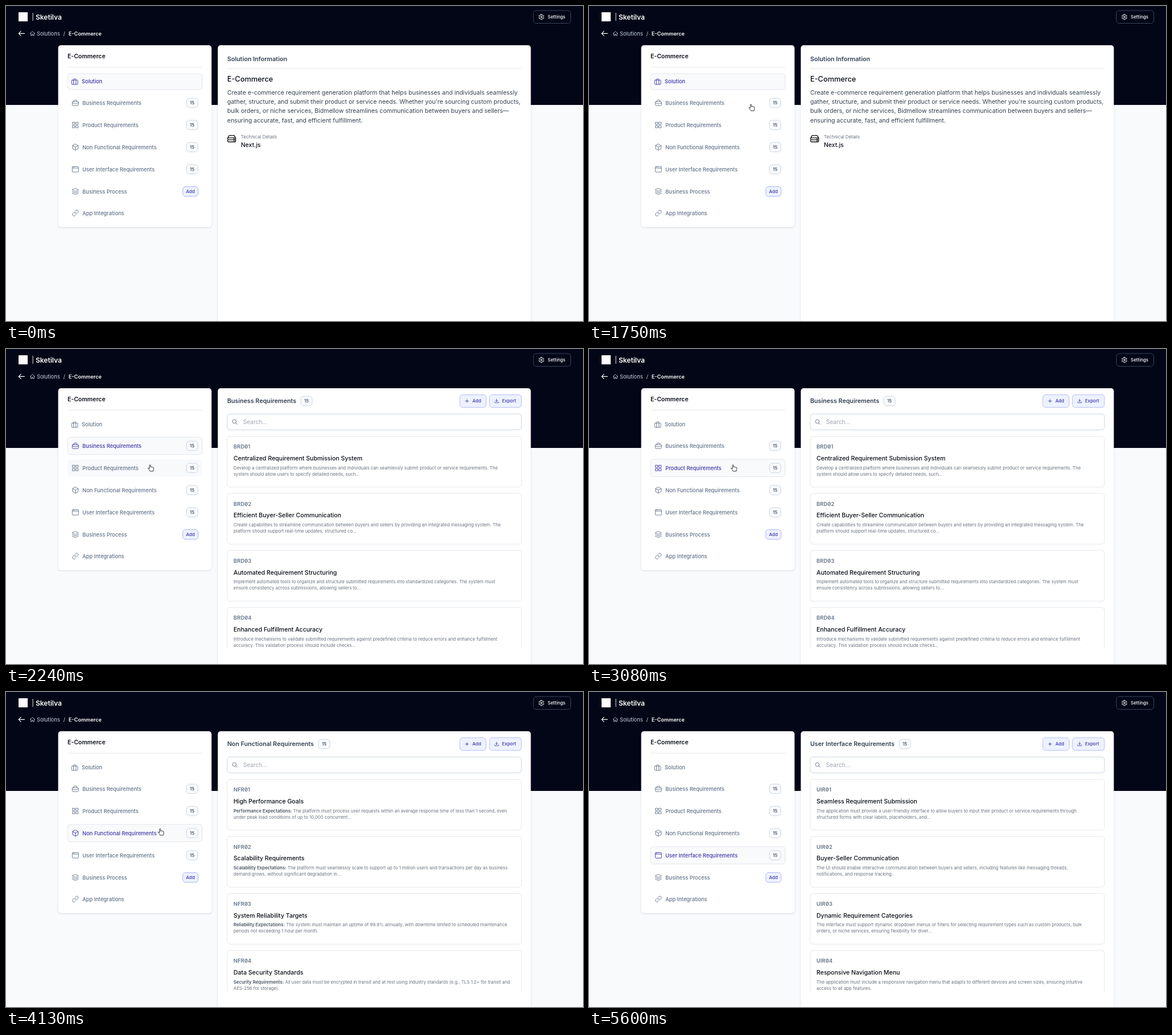
An HTML page for the animation above (6440 ms loop, 1012 by 554 pixels).

```html
<!DOCTYPE html>
<html lang="en">
<head>
<meta charset="utf-8">
<title>Requirements walkthrough</title>
<style>
html, body { margin: 0; width: 100%; height: 100%; overflow: hidden; background: #f8fafc; }
svg { display: block; width: 1012px; height: 554px; font-family: Inter, "Open Sans", sans-serif; }
.icon { fill: none; stroke-linecap: round; stroke-linejoin: round; }
.row { --ink: #64748b; --box: none; --edge: none; }
.row.hover { --box: #f8f9fb; }
.row.active { --ink: #3f38a8; --box: #f9fafb; --edge: #e2e5ea; }
.code { font-feature-settings: "zero"; letter-spacing: .1px; }
.card { filter: drop-shadow(0 1px 1.5px rgba(15, 23, 42, .14)); }
</style>
</head>
<body>
<svg id="stage" viewBox="0 0 1012 554"></svg>
<script>
const LOOP = 6440, STEP = 70;
const INDIGO = '#3f38a8', SLATE = '#64748b', DARK = '#334155', BODY = '#6b7280', LINE = '#e5e7eb';

const ICON = {
  solution: 'M4 7h16q2 0 2 2v10q0 2-2 2H4q-2 0-2-2V9q0-2 2-2ZM8 21V5q0-2 2-2h4q2 0 2 2v16',
  business: 'M4 8h16q2 0 2 2v8q0 3-3 3H5q-3 0-3-3v-8q0-2 2-2ZM7 8V6q0-3 3-3h4q3 0 3 3v2M2 12c6 4 14 4 20 0',
  grid: 'M3 3h7v7H3ZM14 3h7v7h-7ZM14 14h7v7h-7ZM3 14h7v7H3Z',
  cube: 'M12 2l9 5v10l-9 5-9-5V7ZM3 7l9 5 9-5M12 12v10',
  window: 'M4 3h16q2 0 2 2v14q0 2-2 2H4q-2 0-2-2V5q0-2 2-2ZM2 8h20M5 5.5h.1M8 5.5h.1',
  layers: 'M12 2l10 5-10 5L2 7ZM2 12l10 5 10-5M2 17l10 5 10-5',
  link: 'M10 13a5 5 0 0 0 7.5.5l3-3a5 5 0 0 0-7-7l-1.7 1.7M14 11a5 5 0 0 0-7.5-.5l-3 3a5 5 0 0 0 7 7l1.7-1.7',
  home: 'M2 12l10-9 10 9M5 10v11h5v-6h4v6h5V10',
  back: 'M21 12H3M10 5l-7 7 7 7',
  plus: 'M12 4v16M4 12h16',
  download: 'M3 16v3q0 2 2 2h14q2 0 2-2v-3M12 3v12M7 10l5 5 5-5',
  search: 'M16 16l6 6M18 10a8 8 0 1 1-16 0a8 8 0 1 1 16 0',
  gear: 'M10 2h4l.6 3 2.2 1.2 2.9-1 2 3.5-2.3 2v2.6l2.3 2-2 3.5-2.9-1-2.2 1.2-.6 3h-4l-.6-3-2.2-1.2-2.9 1-2-3.5 2.3-2v-2.6l-2.3-2 2-3.5 2.9 1 2.2-1.2ZM15 12a3 3 0 1 1-6 0a3 3 0 1 1 6 0',
  server: 'M2 11l3-6q.6-1 2-1h10q1.4 0 2 1l3 6M4 10h16q2 0 2 2v1q0 2-2 2H4q-2 0-2-2v-1q0-2 2-2ZM4 15h16q2 0 2 2v1q0 2-2 2H4q-2 0-2-2v-1q0-2 2-2ZM17 12.5h2M17 17.5h2'
};

// Text is placed by the vertical centre of its capitals.
const text = (x, y, str, size, fill = BODY, weight = 400, extra = '') =>
  `<text x="${x}" y="${(y + size * .36).toFixed(2)}" font-size="${size}" font-weight="${weight}" style="fill:${fill}" ${extra}>${str}</text>`;
const rect = (x, y, w, h, fill, stroke = 'none', r = 5, extra = '') =>
  `<rect x="${x}" y="${y}" width="${w}" height="${h}" rx="${r}" style="fill:${fill};stroke:${stroke}" ${extra}/>`;
const icon = (name, x, y, size, color, width = 1.7) =>
  `<path class="icon" d="${ICON[name]}" transform="translate(${x - size / 2} ${y - size / 2}) scale(${size / 24})" style="stroke:${color}" stroke-width="${width}"/>`;
const rule = (x, y, w) => rect(x, y, w, 1, LINE, 'none', 0);
const centered = 'text-anchor="middle"';
const badge = (x, y) => rect(x + .5, y - 8.3, 20, 16.6, '#f8fafc', '#cbd5e1') +
  text(x + 10.5, y, '15', 7.8, DARK, 500, centered);

const ROWS = [
  ['Solution', 'solution', 133, 14],
  ['Business Requirements', 'business', 170.3, 15.3, 15],
  ['Product Requirements', 'grid', 209.3, 15.3, 15],
  ['Non Functional Requirements', 'cube', 248.2, 15.3, 15],
  ['User Interface Requirements', 'window', 287.2, 15.3, 15],
  ['Business Process', 'layers', 326.2, 15.3, 'Add'],
  ['App Integrations', 'link', 364.2, 14]
];

function row([label, glyph, y, half, tag], i) {
  const x = i ? 134 : 132.8;
  let out = rect(108, y - half, 236, half * 2, 'var(--box)', 'var(--edge)') +
    icon(glyph, x - 12.3, y, 13, 'var(--ink)') + text(x, y, label, 9.28, 'var(--ink)', 500);
  if (tag === 15) out += badge(316, y);
  if (tag === 'Add') out += rect(310, y - 8.5, 27, 17, '#eef2ff', '#a5b4fc') + text(323.5, y, tag, 7.95, INDIGO, 500, centered);
  return `<g class="row">${out}</g>`;
}

const LISTS = [
  ['Business Requirements', 516.5, 'BRD', [
    ['Centralized Requirement Submission System', 'Develop a centralized platform where businesses and individuals can seamlessly submit product or service requirements. The', 'system should allow users to specify detailed needs, such...'],
    ['Efficient Buyer-Seller Communication', 'Create capabilities to streamline communication between buyers and sellers by providing an integrated messaging system. The', 'platform should support real-time updates, structured co...'],
    ['Automated Requirement Structuring', 'Implement automated tools to organize and structure submitted requirements into standardized categories. The system must', 'ensure consistency across submissions, allowing sellers to...'],
    ['Enhanced Fulfillment Accuracy', 'Introduce mechanisms to validate submitted requirements against predefined criteria to reduce errors and enhance fulfillment', 'accuracy. This validation process should include checks...']
  ]],
  ['Product Requirements', 510, 'PRD', [
    ['Centralized Requirement Submission', 'Develop a centralized platform enabling seamless submission of detailed product or service requirements in a structured format for', 'clarity and accurac...',
      ['Submission Form Screen: Allows users to specify product/service details, including categories, quantities, and preferences.', 'Confirmation Scree...'],
      ['Business Owners: Submit bulk or custom product requirements efficiently.', 'Individuals: Submit niche service or product needs quickly.']],
    ['Integrated Messaging System', 'Create an integrated messaging feature to facilitate real-time communication, structured conversations, and automated', 'notifications between buyers and...',
      ['Messaging Dashboard: Displays ongoing conversations with sellers and notification updates.', 'New Message Screen: Allows users to initiate commun...'],
      ['Buyers: Communicate requirements and receive updates easily.']]
  ]],
  ['Non Functional Requirements', 547.5, 'NFR', [
    ['High Performance Goals', 'Performance Expectations:| The platform must process user requests within an average response time of less than 1 second, even', 'under peak load conditions of up to 10,000 concurrent...'],
    ['Scalability Requirements', 'Scalability Expectations:| The platform must seamlessly scale to support up to 1 million users and transactions per day as business', 'demand grows, without significant degradation in...'],
    ['System Reliability Targets', 'Reliability Expectations:| The system must maintain an uptime of 99.9% annually, with downtime limited to scheduled maintenance', 'periods not exceeding 1 hour per month.'],
    ['Data Security Standards', 'Security Requirements:| All user data must be encrypted in transit and at rest using industry standards (e.g., TLS 1.2+ for transit and', 'AES-256 for storage).']
  ]],
  ['User Interface Requirements', 543.5, 'UIR', [
    ['Seamless Requirement Submission', 'The application must provide a user-friendly interface to allow buyers to input their product or service requirements through', 'structured forms with clear labels, placeholders, and...'],
    ['Buyer-Seller Communication', 'The UI should enable interactive communication between buyers and sellers, including features like messaging threads,', 'notifications, and response tracking.'],
    ['Dynamic Requirement Categories', 'The interface must support dynamic dropdown menus or filters for selecting requirement types such as custom products, bulk', 'orders, or niche services, ensuring flexibility for diver...'],
    ['Responsive Navigation Menu', 'The application must include a responsive navigation menu that adapts to different devices and screen sizes, ensuring intuitive', 'access to all app features.']
  ]]
];

function bullets(title, items, y) {
  return text(399, y, title, 7.95, '#4b5563', 600) + items.map((item, i) =>
    text(403.5, y + 16.3 + i * 17.8, i + 1 + '.', 7.8, '#b6bcc6') +
    text(415.5, y + 16.3 + i * 17.8, item, 7.8)).join('');
}

function card([title, first, second, screens, personas], code, y) {
  const [lead, rest] = first.includes('|') ? first.split('|') : ['', first];
  const strong = lead && `<tspan font-weight="600" style="fill:#4b5563">${lead}</tspan>`;
  let out = rect(388, y, 516, screens ? 202.7 : 89.2, '#fff', LINE) +
    text(399, y + 18.3, code, 9.3, SLATE, 600, 'class="code"') +
    text(399, y + 38.5, title, 10.55, '#0b0f19', 500) +
    text(399, y + 55.2, strong + rest, 7.81) + text(399, y + 66.1, second, 7.81);
  if (screens) {
    out += rect(849, y + 11, 44, 22.5, '#fff', LINE) + text(871, y + 22.3, 'Stories', 8.05, '#111827', 500, centered) +
      bullets('Screens:', screens, y + 88.5) + bullets('Personas:', personas, y + 145.3);
  }
  return out;
}

function list([title, badgeX, code, cards]) {
  const pitch = cards[0][3] ? 213.9 : 100.3;
  return `<g class="view">${text(388, 91.4, title, 10.7, DARK, 600)}${badge(badgeX, 91.4)}<g clip-path="url(#scroll)">` +
    cards.map((c, i) => card(c, `${code}0${i + 1}`, 153.7 + i * pitch)).join('') + '</g></g>';
}

const addButton = (fill, edge, ink, id) => `<g id="${id}">${rect(796, 80.4, 46, 22.4, fill, edge)}` +
  `${icon('plus', 808.5, 91.5, 8.4, ink, 2.4)}${text(818, 91.5, 'Add', 7.95, ink, 500)}</g>`;

const INTRO = [
  'Create e-commerce requirement generation platform that helps businesses and individuals seamlessly',
  "gather, structure, and submit their product or service needs. Whether you're sourcing custom products,",
  'bulk orders, or niche services, Bidmellow streamlines communication between buyers and sellers—',
  'ensuring accurate, fast, and efficient fulfillment.'
];

const overview = '<g class="view">' + text(388, 93.5, 'Solution Information', 10.73, DARK, 600) + rule(388, 109.5, 516) +
  text(388, 128.4, 'E-Commerce', 12.75, '#0b0f19', 500) +
  INTRO.map((s, i) => text(388, 151.8 + i * 16.35, s, 10.53, '#374151')).join('') +
  icon('server', 395.8, 233.3, 17, '#111', 1.9) + text(412, 230.6, 'Technical Details', 7.87) +
  text(412, 244.3, 'Next.js', 10.4, '#0b0f19', 500) + '</g>';

const toolbar = '<g id="tools">' + addButton('#fff', LINE, '#111827', 'plain') + addButton('#eef2ff', '#b3bdf5', INDIGO, 'tinted') +
  rect(848, 80.4, 56, 22.4, '#eef2ff', '#b3bdf5') + icon('download', 860.5, 91.3, 9, INDIGO, 2.2) +
  text(870, 91.5, 'Export', 7.95, INDIGO, 500) + rect(388, 114.2, 516, 28, '#fff', '#cbd5e1') +
  icon('search', 401.3, 128.3, 10, SLATE, 2.2) + text(415.8, 128.4, 'Search...', 10.2, '#9ca3af') + '</g>';

const header = rect(0, 0, 1012, 174, '#020617', 'none', 0) +
  rect(22, 11, 16, 16, '#fff', 'none', 0) + rect(46.6, 12, 1, 14, '#e2e8f0', 'none', 0) +
  text(52, 19.3, 'Sketilva', 12, '#fff', 600) +
  rect(925, 8, 65.5, 22.5, 'none', '#3b4558') + icon('gear', 939, 19.2, 11, '#fff', 2.1) +
  text(950, 19.2, 'Settings', 7.95, '#fff', 500) +
  icon('back', 27.3, 48.4, 13.5, '#fff', 2) + icon('home', 46.4, 48.3, 10, '#cbd5e1', 1.9) +
  text(54, 48.6, 'Solutions', 9.3, '#cbd5e1') + text(100.5, 48.6, '/', 9.3, '#cbd5e1') +
  text(109.8, 48.6, 'E-Commerce', 9.1, '#fff', 600);

const cursor = '<g id="cursor"><path id="hand" transform="translate(-6 -6.3)" fill="#fff" stroke="#222" stroke-width=".9" stroke-linejoin="round" ' +
  'd="M3.6 7.6V1.6a1 1 0 0 1 2 0V5q.1-.8 1-.8t1 .9q.2-.6.9-.6t.9.9q.2-.4.8-.4.8 0 .8 1V8.6c0 1-.9 1.8-.9 3.4H4.6C4.4 10.4 2.2 8.6 1.2 7.4.6 6.6 1.5 5.9 2.2 6.4Z"/>' +
  '<path id="arrow" transform="translate(-3.5 -6)" fill="#000" stroke="#fff" stroke-width=".9" d="M0 0V11l2.6-2.4 1.7 3.9 1.7-.7-1.7-3.8H8Z"/></g>';

const stage = document.getElementById('stage');
stage.innerHTML = '<clipPath id="scroll"><rect x="380" y="150" width="532" height="377"/></clipPath>' + header +
  rect(91.5, 69, 269, 320, '#fff', 'none', 5, 'class="card"') + rect(371.5, 69, 549, 500, '#fff', 'none', 5, 'class="card"') +
  text(108, 88.2, 'E-Commerce', 10.45, '#0b0f19', 600) + rule(108, 107, 236) +
  ROWS.map(row).join('') + overview + LISTS.map(list).join('') + toolbar + cursor;

const rows = [...stage.querySelectorAll('.row')], views = [...stage.querySelectorAll('.view')];
const [tools, plain, tinted, pointer, hand, arrow] =
  ['tools', 'plain', 'tinted', 'cursor', 'hand', 'arrow'].map(id => document.getElementById(id));

const SELECT = [1820, 3080, 4130, 5040];
const SHOW = [1820, 3150, 4130, 5040];
const PATH = [
  [70, 478, 519], [350, 143, 136.5], [560, 285.3, 178.6], [1820, 285.3, 178.6], [2240, 254, 209.3],
  [3150, 254, 209.3], [3570, 271.7, 246.2], [4270, 271.7, 246.2], [4550, 271.7, 288.3],
  [5390, 271.7, 288.3], [5530, 422.5, 528]
];

const clamp = v => Math.max(0, Math.min(1, v));
const passed = (times, t) => times.filter(at => t >= at).length;
const show = (el, on) => el.style.display = on ? '' : 'none';

function locate(t) {
  const i = Math.max(1, Math.min(PATH.length - 1, passed(PATH.map(p => p[0]), t)));
  const [a, b] = [PATH[i - 1], PATH[i]];
  const k = clamp((t - a[0]) / (b[0] - a[0])), e = k * k * (3 - 2 * k);
  return [a[1] + (b[1] - a[1]) * e, a[2] + (b[2] - a[2]) * e];
}

function draw(t) {
  const [x, y] = locate(t), active = passed(SELECT, t), view = passed(SHOW, t);
  const visible = t >= 70 && t < 5600, inMenu = x > 108 && x < 344 && y > 119 && y < 380;
  rows.forEach((el, i) => {
    const over = visible && t >= 1820 && inMenu && Math.abs(y - ROWS[i][2]) < ROWS[i][3];
    el.classList.toggle('active', i === active);
    el.classList.toggle('hover', over && i !== active);
  });
  views.forEach((el, i) => show(el, i === view));
  show(tools, view > 0);
  const tint = clamp((t - 1820) / 140);
  show(plain, tint < 1);
  tinted.style.opacity = tint;
  show(pointer, visible);
  show(hand, inMenu);
  show(arrow, !inMenu);
  pointer.setAttribute('transform', `translate(${x.toFixed(2)} ${y.toFixed(2)})`);
}

const start = performance.now();
function tick(now) {
  const t = Math.max(0, now - start) % LOOP;
  draw(Math.floor(t / STEP) * STEP);
  requestAnimationFrame(tick);
}
draw(0);
requestAnimationFrame(tick);
</script>
</body>
</html>
```
